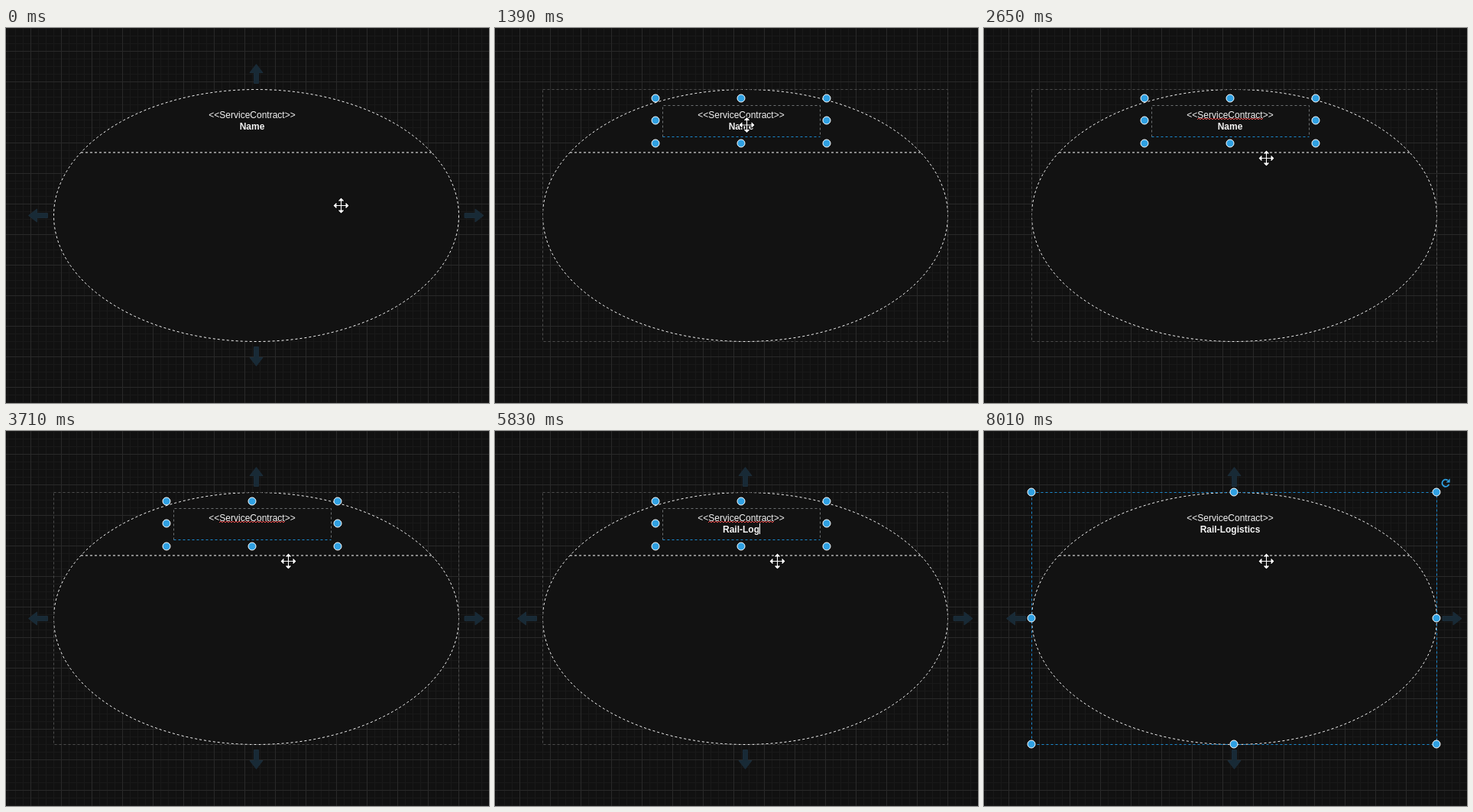
An HTML page that plays this animation: 632x491 px, repeating every 8.94 s.

```html
<!DOCTYPE html>
<html lang="en">
<head>
<meta charset="utf-8">
<title>Renaming a service contract</title>
<style>
  html, body { margin: 0; width: 100%; height: 100%; overflow: hidden; background: #111; }
  svg { display: block; width: 632px; height: 491px; }
  text { font: 12px "Liberation Sans", Arial, sans-serif; fill: #f4f4f4; text-anchor: middle; }
  #name { font-weight: bold; }
  .selected text { fill: #121212; }
  .dash { fill: none; stroke-width: 1; stroke-dasharray: 3 3; }
  .white { stroke: #fff; }
  .grey { stroke: #4c4c4c; }
  .blue { stroke: #1a8ad0; }
  .arrows path { fill: #182a36; stroke: #1b2c38; }
  .handles circle { fill: #2fa0e2; stroke: #fff; }
  #marks path { fill: none; stroke-width: 1.7; }
  .cursor { fill: #fff; stroke: #000; stroke-width: 1.6; paint-order: stroke; }
</style>
</head>
<body>
<svg viewBox="0 0 632 491">
  <defs>
    <pattern id="grid" x="-8" y="-10" width="40" height="40" patternUnits="userSpaceOnUse">
      <path d="M10.5 0V40M20.5 0V40M30.5 0V40M0 10.5H40M0 20.5H40M0 30.5H40" stroke="#191919"/>
      <path d="M.5 0V40M0 .5H40" stroke="#292929"/>
    </pattern>
  </defs>
  <rect width="632" height="491" fill="#111"/>
  <rect width="632" height="491" fill="url(#grid)"/>

  <ellipse class="dash white" cx="327.5" cy="245.5" rx="265" ry="165" style="fill:#121212"/>
  <path class="dash white" d="M98 163H557"/>

  <g id="label">
    <g id="selection" fill="#3399ff">
      <rect x="265" y="107" width="114" height="14"/>
      <rect x="305" y="121" width="33" height="15"/>
    </g>
    <text x="322" y="118">&lt;&lt;ServiceContract&gt;&gt;</text>
    <text id="name" x="322" y="133"></text>
    <rect id="caret" y="121" width="1" height="14" fill="#fff"/>
    <path id="squiggle" fill="none" stroke="#f04848"/>
  </g>

  <g id="shapeArrows" class="arrows"></g>
  <g id="labelArrows" class="arrows"></g>
  <g id="editArrows" class="arrows"></g>
  <g id="marks"></g>

  <g id="labelBox">
    <rect class="dash grey" x="62.5" y="80.5" width="530" height="330"/>
    <path class="dash" stroke="#6d7072" d="M219.5 142.5V101.5H425.5V142.5"/>
    <path class="dash blue" d="M219.5 142.5H425.5"/>
    <g id="labelHandles" class="handles"></g>
  </g>

  <g id="shapeBox">
    <rect class="dash blue" x="62.5" y="80.5" width="530" height="330"/>
    <g id="shapeHandles" class="handles"></g>
    <path d="M606.8 64.5A4.6 4.6 0 1 0 608.4 69.8" fill="none" stroke="#2fa0e2" stroke-width="1.8"/>
    <path d="M604.6 67.4H609.6V62.2Z" fill="#2fa0e2"/>
  </g>

  <path id="move" class="cursor" d="M0-10 3.5-6.5V-6H.6V-.6H6V-3.5H6.5L10 0 6.5 3.5H6V.6H.6V6H3.5V6.5L0 10-3.5 6.5V6H-.6V.6H-6V3.5H-6.5L-10 0-6.5-3.5H-6V-.6H-.6V-6H-3.5V-6.5Z"/>
  <path id="pointer" class="cursor" d="M0 0V16L3.8 12.6 6.5 18.8 9 17.7 6.4 11.6H11.5Z"/>
</svg>
<script>
const LOOP = 8940;
const $ = id => document.getElementById(id);
const show = (id, on) => { $(id).style.display = on ? '' : 'none'; };
const within = (t, a, b) => t >= a && t < b;

function add(parent, tag, attrs) {
  const el = document.createElementNS('http://www.w3.org/2000/svg', tag);
  for (const key in attrs) el.setAttribute(key, attrs[key]);
  $(parent).append(el);
}

// Four arrows pointing away from a box
function addArrows(id, x0, y0, x1, y1) {
  const cx = (x0 + x1) / 2, cy = (y0 + y1) / 2;
  const spots = [[cx, y0 - 20.5, 0], [x1 + 20, cy, 90], [cx, y1 + 19.5, 180], [x0 - 20.5, cy, 270]];
  for (const [x, y, turn] of spots) add(id, 'path', {
    d: 'M-3 12.5H3V-1.5H8.5L0-12.5-8.5-1.5H-3Z',
    transform: `translate(${x} ${y}) rotate(${turn})`
  });
}

function addHandles(id, xs, ys) {
  xs.forEach((cx, i) => ys.forEach((cy, j) => {
    if (i !== 1 || j !== 1) add(id, 'circle', { cx, cy, r: 5 });
  }));
}

function addMarks() {
  const blue = ['00', '01', '02', '10', '40', '41', '42', '24', '34'];
  for (let i = 0; i < 5; i++) for (let j = 0; j < 5; j++) {
    if (i % 4 && j % 4) continue;
    const x = Math.floor(219 + i * 51.6) + .5, y = Math.floor(101 + j * 10.3) + .5;
    add('marks', 'path', {
      d: `M${x - 2} ${y - 2}l4 4m0-4l-4 4`,
      stroke: blue.includes(`${i}${j}`) ? '#2b9fe0' : '#808080'
    });
  }
}

addArrows('shapeArrows', 62.5, 80.5, 592.5, 410.5);
addArrows('labelArrows', 219.5, 101.5, 425.5, 142.5);
addArrows('editArrows', 210.5, 92.5, 434.5, 151.5);
addHandles('shapeHandles', [62, 327, 592], [80, 245, 410]);
addHandles('labelHandles', [210, 322, 434], [92, 121, 151]);
addMarks();

let wave = 'M279 120';
for (let i = 0; i < 43; i++) wave += `l2 ${i % 2 ? 2 : -2}`;
$('squiggle').setAttribute('d', wave);

// Time, text, caret
const edits = [
  [0, 'Name', 0], [2120, 'Name', 1], [2650, 'Name', 0], [3110, 'Name', 1],
  [3170, 'Nam', 1], [3240, 'Na', 1], [3440, 'N', 1], [3640, '', 1], [3710, '', 0], [4170, '', 1]
];
const title = 'Rail-Logistics';
[4240, 4370, 4570, 5100, 5440, 5640, 5740, 5830, 6100, 6230, 6370, 6570, 6890, 7020]
  .forEach((time, i) => edits.push([time, title.slice(0, i + 1), 1]));
edits.push([4770, 'Rai', 0], [5300, 'Rail', 0], [7420, title, 0]);
edits.sort((a, b) => a[0] - b[0]);

// Start, end, steps, from, to
const moves = [
  [130, 330, 4, [438.5, 232.5], [400.5, 216.5]],
  [530, 990, 7, [400.5, 216.5], [329.5, 127]],
  [1720, 1850, 2, [329.5, 127], [338, 126]],
  [1990, 2390, 6, [338, 126], [369.5, 170.5]]
];

function cursorAt(t) {
  let pos = moves[0][3];
  for (const [a, b, n, from, to] of moves) {
    if (t < a) break;
    const step = Math.floor((t - a) / (b - a) * (n - 1) + 1e-6) + 1;
    const p = Math.min(1, step / n);
    pos = from.map((v, i) => v + (to[i] - v) * p);
  }
  return pos;
}

let last;
function draw(t) {
  const edit = edits.filter(e => e[0] <= t).pop();
  if (edit !== last) {
    last = edit;
    $('name').textContent = edit[1];
    const width = edit[1] ? $('name').getComputedTextLength() : 0;
    $('caret').setAttribute('x', Math.floor(322 + width / 2));
    show('caret', edit[2]);
  }
  const selected = within(t, 1850, 2120);
  show('selection', selected);
  $('label').setAttribute('class', selected ? 'selected' : '');
  show('squiggle', within(t, 1850, 7850));
  show('marks', within(t, 860, 1260));
  show('labelBox', within(t, 1260, 7850));
  show('shapeBox', t >= 7850);
  show('shapeArrows', t < 1260 || within(t, 2850, 7850) || t >= 8010);
  show('labelArrows', within(t, 1460, 1780));
  show('editArrows', within(t, 1990, 2310));

  const [x, y] = cursorAt(t);
  const pointing = t >= 1720 && t < 2390 && y < 143;
  show('pointer', pointing);
  show('move', !pointing);
  $(pointing ? 'pointer' : 'move').setAttribute('transform', `translate(${x} ${y})`);
}

const start = performance.now();
function tick() {
  draw((performance.now() - start) % LOOP);
  requestAnimationFrame(tick);
}
tick();
</script>
</body>
</html>
```
